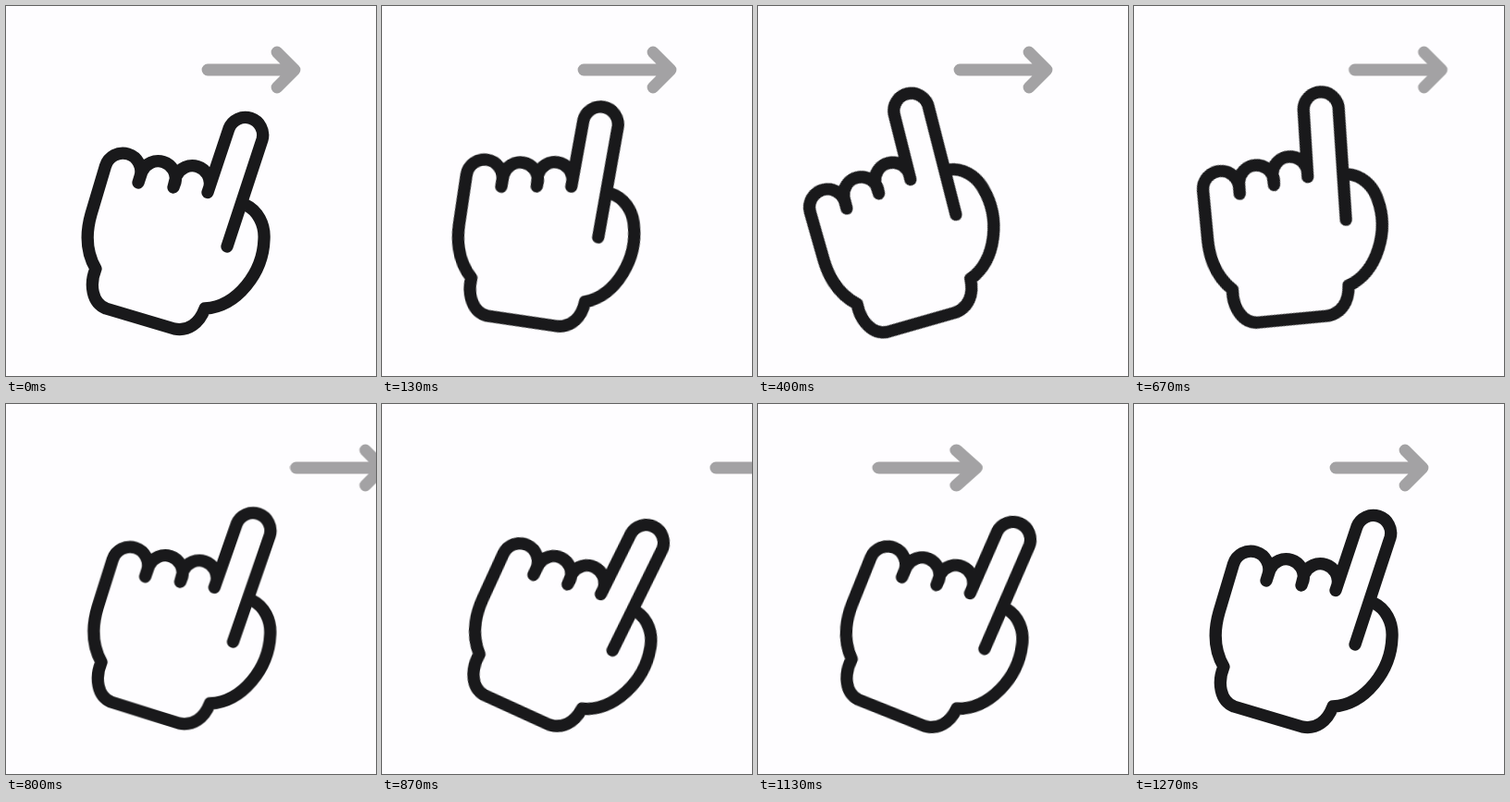
Animation, 400 px wide and 400 px high, one loop 1470 ms. Source, as an HTML page:

```html
<!DOCTYPE html>
<html lang="en">
<head>
<meta charset="utf-8">
<title>Swipe right</title>
<style>
  html, body { margin: 0; width: 100%; height: 100%; overflow: hidden; background: #fefdff; }
  svg { display: block; width: 100%; height: 100%; }
  path { fill: none; stroke-width: 13.3; stroke-linecap: round; stroke-linejoin: round; }
  #hand { stroke: #19191b; }
  #arrow { stroke: #a3a2a4; stroke-width: 12.8; }
</style>
</head>
<body>
<svg viewBox="0 0 400 400">
  <path id="arrow" d="M218 69H312M293 50L312 69L293 88"/>
  <path id="hand" d="
    M239 260L277 144.5A19 19 0 0 0 241 132.5L218 201.5L220 195.5
    A19 19 0 0 0 184 184L181 196L183 190.5
    A19 19 0 0 0 147 179L143 191L145 184.5
    A19.5 19.5 0 0 0 107.5 173L92 225C86 246 86 265 97 284
    C90 301 93 321 108 327L182 349C197 352 209 343 215 327
    C250 325 278 288 279 252C280 236 272 221 259 215"/>
</svg>
<script>
const LOOP = 1470, FPS = 15, TICKS = 22;
const WRIST = { x: 195.3, y: 293.8 }, TIP = 319;
const LEFT = -32.5, RIGHT = 10.5;
const SWIPE = 9, BACK = 15, END = 19; // ticks: swipe starts, hand turns back, all at rest

const clamp = u => Math.min(1, Math.max(0, u));
const inOut = u => (1 - Math.cos(Math.PI * clamp(u))) / 2;
const out = u => Math.sin(Math.PI / 2 * clamp(u)) ** 1.2;

// The hand turns about the wrist, which sinks with the angle and is nudged by the swipe
function hand(k) {
  const angle = LEFT * inOut(k / 6)
    + (RIGHT - LEFT) * out((k - SWIPE) / 5)
    - RIGHT * inOut((k - BACK) / (END - BACK));
  const nudge = k > SWIPE ? clamp((END - k) / (END - BACK)) : 0;
  const x = WRIST.x + 6 * nudge, y = WRIST.y + angle / 2 - 4 * nudge;
  return `translate(${x}px, ${y}px) rotate(${angle}deg) translate(${-WRIST.x}px, ${-WRIST.y}px)`;
}

// The arrow speeds off to the right, then comes in stretched from the left and settles
function arrow(k) {
  const gone = Math.max(0, k - SWIPE), left = Math.max(0, END - k);
  const x = gone < 5 ? 20.5 * gone ** 1.4 : -28.6 * left ** 1.4;
  const stretch = 1 + Math.max(0, -x) / 640;
  return `translate(${TIP + x}px, 0px) scale(${stretch}, 1) translate(${-TIP}px, 0px)`;
}

function play(id, pose) {
  const frames = Array.from({ length: TICKS }, (_, k) => ({
    offset: Math.round(k * 100 / FPS) * 10 / LOOP,
    transform: pose(k),
    easing: 'step-end'
  }));
  frames.push({ offset: 1, transform: pose(0) });
  document.getElementById(id).animate(frames, { duration: LOOP, iterations: Infinity });
}

play('hand', hand);
play('arrow', arrow);
</script>
</body>
</html>
```
